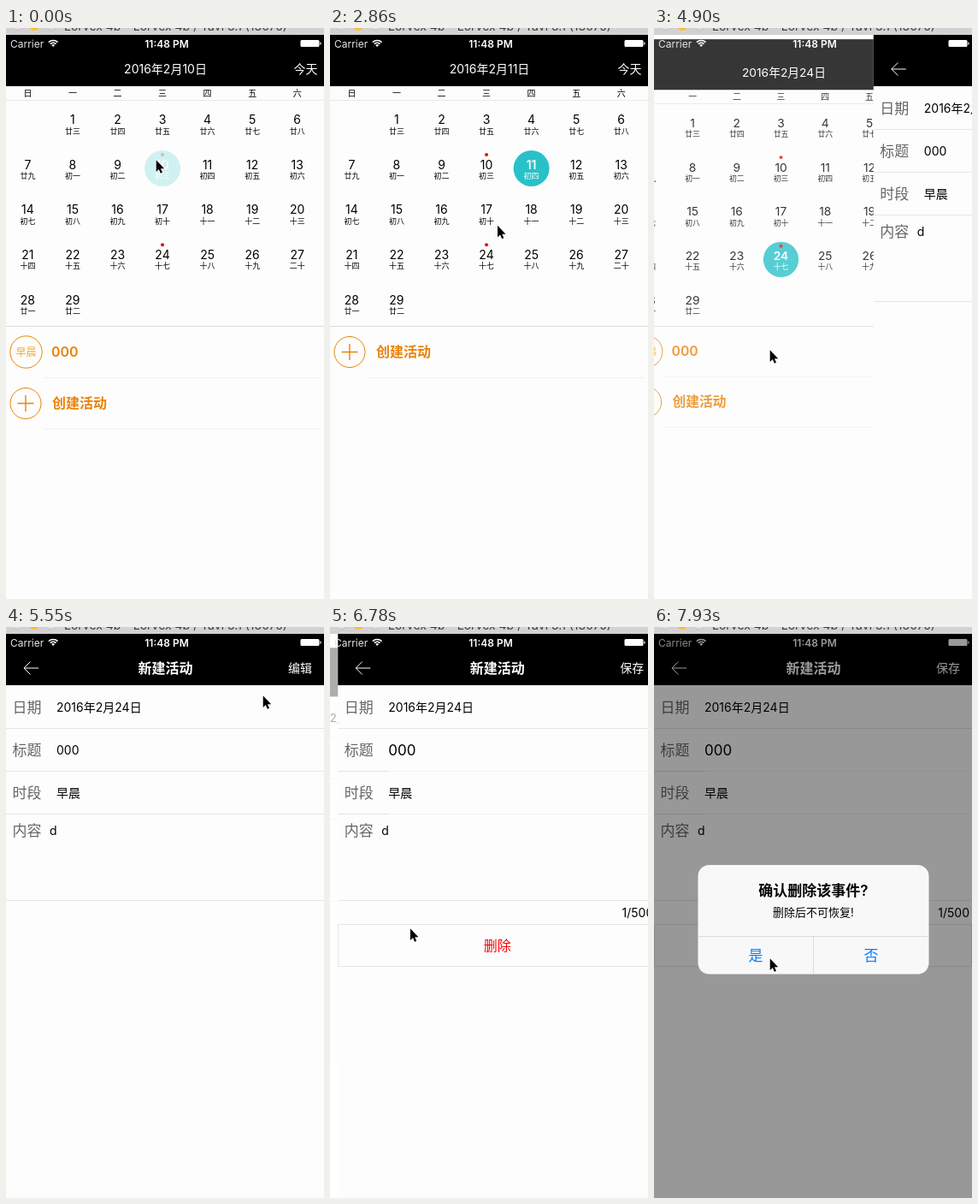
Write an HTML page that moves like this. It is 372 by 667 pixels and loops after 7990 ms.

```html
<!DOCTYPE html>
<html lang="zh-CN">
<head>
<meta charset="utf-8">
<title>Calendar</title>
<style>
  html, body { margin: 0; height: 100%; overflow: hidden; background: #fff; }
  svg { display: block; width: 100%; height: 100%; }
  text { font-family: Inter, 'Noto Sans CJK SC', 'Noto Sans CJK', 'Noto Sans', sans-serif; white-space: pre; }
</style>
</head>
<body>
<svg id="stage" viewBox="0 0 372 667"></svg>
<script>
const LOOP = 7990, CENTER_X = 186, CENTER_Y = 341.5;
const TEAL = '#29c1c8', ORANGE = '#ea8208', AMBER = '#f7a827';

// y is the optical middle of the line of text; the baseline sits on a whole pixel
const text = (x, y, size, str, fill = '#000', anchor = 'start', weight = 400) =>
  `<text x="${x}" y="${Math.round(y + size * .37)}" font-size="${size}" fill="${fill}" text-anchor="${anchor}" font-weight="${weight}">${str}</text>`;
const rect = (x, y, w, h, fill, extra = '') =>
  `<rect x="${x}" y="${y}" width="${w}" height="${h}" fill="${fill}" ${extra}/>`;
const circle = (x, y, r, fill, extra = '') =>
  `<circle cx="${x}" cy="${y}" r="${r}" fill="${fill}" ${extra}/>`;
const path = (d, stroke, width = 1) =>
  `<path d="${d}" fill="none" stroke="${stroke}" stroke-width="${width}"/>`;
const rule = (x1, x2, y, color) => rect(x1, y, x2 - x1, 1, color);
const page = body => rect(0, 8, 372, 667, '#fdfdfd') + rect(0, 8, 372, 60, '#000') + body;

function lunarName(day) {
  const n = (day + 21) % 29 + 1;
  return n === 20 ? '二十' : '初十廿'[Math.floor((n - 1) / 10)] + '十一二三四五六七八九'[n % 10];
}

function dayCell(day, selected, pale) {
  const x = 25.4 + day % 7 * 52.55, y = 107 + Math.floor(day / 7) * 52.6;
  const on = day === selected, color = on ? '#fff' : '#000';
  return (on ? circle(x, y + 4.4, 21, TEAL, `opacity="${pale ? .21 : 1}"`) : '')
    + text(x, y, 14, day, color, 'middle', on ? 600 : 400)
    + text(x, y + 13.3, 9, lunarName(day), color, 'middle')
    + (day === 10 || day === 24 ? circle(x, y - 11.5, 2, '#f00808', `opacity="${on && pale ? .25 : 1}"`) : '');
}

function eventRow([period, title]) {
  return circle(23.5, 378.5, 18.7, 'none', `stroke="${ORANGE}"`)
    + text(23.5, 378.5, 12, period, AMBER, 'middle')
    + text(53, 378.5, 16, title, ORANGE, 'start', 600)
    + rule(44, 368, 408, '#f2f2f2');
}

function createRow(y) {
  return circle(23, y, 18, 'none', `stroke="${ORANGE}"`)
    + path(`M13.5 ${y}H32.5M23 ${y - 9.5}V${y + 9.5}`, ORANGE, 1.4)
    + text(54, y, 16, '创建活动', ORANGE, 'start', 600)
    + rule(44, 368, y + 29.5, '#f2f2f2');
}

function calendarPage(selected, pale, event) {
  let body = text(186.5, 48, 14, `2016年2月${selected}日`, '#fff', 'middle')
    + text(350.5, 48, 14, '今天', '#fff', 'middle');
  [...'日一二三四五六'].forEach((name, i) => body += text(25.4 + i * 52.55, 76.5, 10, name, '#000', 'middle'));
  body += rule(0, 372, 84, '#e8e8e8');
  for (let day = 1; day <= 29; day++) body += dayCell(day, selected, pale);
  body += rule(0, 372, 348, '#dcdcdc');
  body += event ? eventRow(event) + createRow(438.5) : createRow(378.5);
  return page(body);
}

function formPage(action, titleSize, rules) {
  const rows = [['日期', '2016年2月24日', 14], ['标题', '000', titleSize], ['时段', '早晨', 14]];
  return path('M38 48H21M28.5 40.5L21 48L28.5 55.5', '#fff')
    + text(186.5, 48, 16, '新建活动', '#fff', 'middle', 600)
    + text(344, 48, 14, action, '#fff', 'middle')
    + rows.map(([label, value, size], i) =>
        text(7.5, 93.5 + i * 50, 17, label, '#666') + text(59, 93.5 + i * 50, size, value)).join('')
    + text(7.5, 238, 17, '内容', '#666') + text(51, 238, 14, 'd')
    + rule(0, 372, 118, '#e6e6e6') + rules + rule(0, 372, 319, '#e6e6e6');
}

const detailPage = page(
  formPage('编辑', 14, rule(0, 372, 168, '#e6e6e6') + rule(0, 372, 218, '#e6e6e6')));

const editPage = page(
  formPage('保存', 17, [168, 218].map(y => rule(0, 60, y, '#e2e2e2') + rule(60, 372, y, '#f3f3f3')).join(''))
  + text(369, 333.5, 14, '1/500', '#000', 'end')
  + rect(.5, 347.5, 371, 49, '#fdfdfd', 'stroke="#e4e4e4"')
  + text(186.5, 372, 16, '删除', '#f00', 'middle')
  + group('pressed', rect(0, 347, 372, 50, '#d5d5d5', 'opacity=".5"')));

function group(id, body = '') { return `<g id="${id}">${body}</g>`; }

const wifiArc = r => `M${55.2 - r * .7} ${22 - r * .7}A${r} ${r} 0 0 1 ${55.2 + r * .7} ${22 - r * .7}`;
const statusBar = text(5, 18.5, 12, 'Carrier', '#e4e4e4')
  + path(wifiArc(7.6) + wifiArc(4.8), '#fff', 1.7)
  + `<path d="${wifiArc(2.8)}L55.2 22Z" fill="#fff"/>`
  + text(188, 18.5, 12, '11:48 PM', '#fff', 'middle', 600)
  + rect(344.5, 14, 22, 8, '#fff', 'rx="1.5"') + rect(367.3, 16.4, 1.2, 3.2, '#fff', 'rx=".6"');

const windowBar = rect(0, 0, 372, 8, '#d3d1d3')
  + circle(13, -3, 6, '#dcdadc', 'stroke="#c2c0c2"') + circle(33, -3, 6, '#fdbc2e')
  + circle(53, -3, 6, '#dcdadc', 'stroke="#c2c0c2"')
  + text(68, -2.5, 14, 'Lorvex 4b - Lorvex 4b / Tavi 3.1 (13075)', '#3c3c3c');

const alertBox = rect(51.5, 278, 270, 127.5, '#f8f8f8', 'rx="13"')
  + text(186.5, 308, 17, '确认删除该事件?', '#000', 'middle', 600)
  + text(186.5, 333, 13, '删除后不可恢复!', '#000', 'middle')
  + rule(51.5, 321.5, 361, '#dcdcdc') + rect(186, 361, 1, 44.5, '#dcdcdc')
  + text(119, 384, 17, '是', '#0a7cff', 'middle') + text(254, 384, 17, '否', '#0a7cff', 'middle');

const arrow = '<path d="M0 0V15.5L3.5 12.2L5.8 17.6L8.3 16.5L6 11.3H10.8Z" transform="translate(-.3 .3) scale(.88)" stroke="#fff" stroke-width="1.6" paint-order="stroke"/>';

document.getElementById('stage').innerHTML = rect(0, 0, 372, 667, '#fff')
  + group('calendar') + group('detail', detailPage) + group('edit', editPage)
  + group('status', statusBar)
  + rect(0, 8, 372, 659, '#000', 'id="dim"') + group('alert', alertBox) + windowBar
  + group('cursor', arrow);
const el = Object.fromEntries([...document.querySelectorAll('[id]')].map(node => [node.id, node]));

const clamp = v => Math.min(1, Math.max(0, v));
const easeInOut = u => (1 - Math.cos(Math.PI * clamp(u))) / 2;

// time, x, y of the pointer tip
const pointerPath = [
  [0, 176, 154], [1080, 176, 154], [1350, 173, 172], [1600, 177, 195], [1720, 177, 191], [1820, 177, 184],
  [2160, 233, 155], [2600, 233, 155], [2970, 181, 262], [3430, 181, 262], [3800, 136, 376],
  [5050, 136, 376], [5490, 286, 98], [5550, 301, 80], [5730, 301, 80], [5930, 340, 44],
  [6280, 340, 44], [6780, 94, 352], [7030, 151, 363], [7450, 151, 363], [7900, 136, 387], [LOOP, 136, 387]
];
function pointerAt(t) {
  const i = pointerPath.findIndex(point => point[0] > t);
  const [t0, x0, y0] = pointerPath[i - 1], [t1, x1, y1] = pointerPath[i];
  const u = (t - t0) / (t1 - t0);
  return [x0 + (x1 - x0) * u, y0 + (y1 - y0) * u];
}

let shownCalendar = '';
function drawCalendar(t) {
  const selected = t < 2340 ? 10 : t < 3210 ? 11 : 24;
  const pale = t < 120 || t >= 2340 && t < 2580 || t >= 3210 && t < 3450;
  const event = t < 120 || t >= 3450 ? ['早晨', '000'] : t < 2580 ? ['中午', 'hahaha'] : null;
  const key = [selected, pale, event].join();
  if (key !== shownCalendar) el.calendar.innerHTML = calendarPage(selected, pale, event);
  shownCalendar = key;
}

// The old page shrinks and fades to white while the new one slides over it.
function push(from, to, p) {
  from.setAttribute('transform',
    `translate(${CENTER_X - 111.6 * p} ${CENTER_Y}) scale(${1 - .05 * p}) translate(${-CENTER_X} ${-CENTER_Y})`);
  from.setAttribute('opacity', p < 1 ? 1 - .7 * p : 0);
  to.setAttribute('transform', `translate(${372 * (1 - p)} 0)`);
}

function draw(t) {
  drawCalendar(t);
  const toDetail = easeInOut((t - 4700) / 535), toEdit = easeInOut((t - 6300) / 535);
  push(el.calendar, el.detail, toDetail);
  if (toEdit > 0) push(el.detail, el.edit, toEdit);
  else {
    el.detail.setAttribute('opacity', 1);
    el.edit.setAttribute('transform', 'translate(372 0)');
  }

  const s = Math.max(0, t - 7270) * .0145;
  const shown = 1 - (1 + s) * Math.exp(-s);
  el.pressed.setAttribute('opacity', t < 7270 ? 0 : 1 - clamp((t - 7450) / 250));
  el.dim.setAttribute('opacity', .4 * shown);
  el.alert.setAttribute('opacity', shown);
  el.alert.setAttribute('transform',
    `translate(186.5 ${CENTER_Y}) scale(${1.2 - .2 * shown}) translate(-186.5 ${-CENTER_Y})`);
  el.cursor.setAttribute('transform', `translate(${pointerAt(t).join(' ')})`);
}

const start = performance.now();
function tick() {
  draw((performance.now() - start) % LOOP);
  requestAnimationFrame(tick);
}
tick();
</script>
</body>
</html>
```
